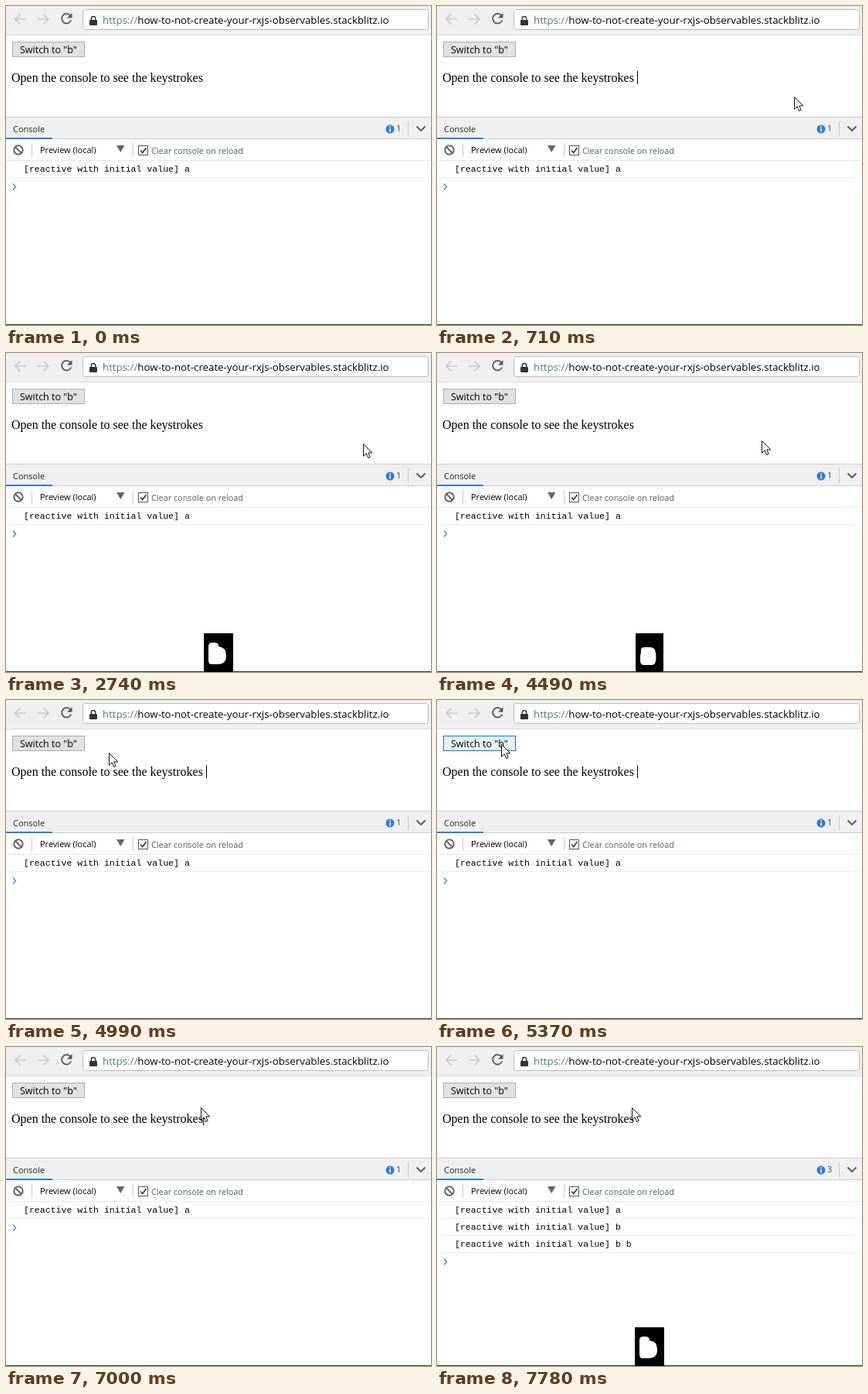
These frames come from a looping animation (550x412 px, 8 s). An HTML page:

```html
<!DOCTYPE html>
<html lang="en">
<head>
<meta charset="utf-8">
<style>
  html, body { margin: 0; width: 100%; height: 100%; overflow: hidden; background: #fff; }
  svg { display: block; font-family: "Open Sans", "Noto Sans", sans-serif; font-size: 11px; }
  text { white-space: pre; }
  .log { font: 11.55px "Liberation Mono", monospace; }
  .line { fill: none; stroke: #ccc; }
  .faint { stroke: #e8e8e8; }
  #button rect { fill: #e1e1e1; stroke: #adadad; }
  #button.hover rect { fill: #e5f1fb; stroke: #0078d7; }
  #button.down rect { fill: #cce4f7; stroke: #005499; }
</style>
</head>
<body>
<svg width="550" height="412" viewBox="0 0 550 412">
  <defs>
    <g id="a"><path d="M11 18H19Q25 18 26 25Q28 41 21 41H11Q6 41 6 35V30Q6 27 7 25Q6 18 11 18Z"/></g>
    <g id="b"><path d="M6 17Q6 12 11 12H14Q19 12 19 17Q29 18 29 29Q29 40 18 40H10Q6 40 6 35Z"/></g>
  </defs>

  <!-- Address bar -->
  <rect width="550" height="37" fill="#f0f0f0"/>
  <path class="line" stroke-opacity=".7" d="M0 37.5H550"/>
  <g fill="none" stroke="#c9c9c9" stroke-width="1.7">
    <path d="M26 17H12M18.5 10.5L12 17L18.5 23.5M41 17H55M48.5 10.5L55 17L48.5 23.5"/>
    <path stroke="#555" stroke-width="1.8" d="M83.6 12.5A6.3 6.3 0 1 0 84.3 18.5"/>
  </g>
  <path d="M85.5 9V15.5H79Z" fill="#555"/>
  <rect x="99.5" y="4.5" width="447" height="26" rx="3" fill="#fff" stroke="#bcbcbc"/>
  <rect x="108" y="18" width="10" height="7" rx="1" fill="#333"/>
  <path d="M110.3 18V16.2a2.7 2.7 0 0 1 5.4 0V18" fill="none" stroke="#333" stroke-width="1.4"/>
  <text x="125" y="23" font-size="13.3"><tspan fill="#4c8068">https</tspan><tspan fill="#777">://</tspan>how-to-not-create-your-rxjs-observables.stackblitz.io</text>

  <!-- Page -->
  <g id="button">
    <rect x="8.5" y="46.5" width="93" height="19"/>
    <text x="18" y="60.5" font-size="12.5">Switch to "b"</text>
  </g>
  <text x="7" y="98" font-family="Liberation Serif, serif" font-size="16">Open the console to see the keystrokes</text>
  <rect id="caret" y="84" width="1" height="17"/>

  <!-- Console -->
  <rect y="143" width="550" height="29" fill="#f0f0f0"/>
  <path class="line" d="M0 143.5H550M0 171.5H550M33.5 177V195M164.5 177V195M520.5 149V168"/>
  <path class="line faint" d="M0 199.5H550"/>
  <rect y="170" width="60" height="2" fill="#2a7de1"/>
  <text x="9" y="163" fill="#222">Console</text>
  <circle cx="497" cy="159" r="5.5" fill="#2a7de1"/>
  <path d="M497 155.3v1.6M497 158v4.5" stroke="#fff" stroke-width="1.6"/>
  <text id="count" x="505" y="162" fill="#444"></text>
  <path d="M531.5 155.5L537 161L542.5 155.5" fill="none" stroke="#555" stroke-width="1.8"/>
  <g fill="none" stroke="#666" stroke-width="2">
    <circle cx="16" cy="186" r="5.7"/><path d="M12 182L20 190"/>
  </g>
  <text x="44" y="190">Preview (local)</text>
  <path d="M143 180H153.5L148.2 189Z" fill="#666"/>
  <rect x="171.5" y="180.5" width="12" height="12" fill="#fff" stroke="#555"/>
  <path d="M174 186.5L176.7 189.5L181.5 183" fill="none" stroke="#333" stroke-width="1.6"/>
  <text x="188" y="191" font-size="10.85" fill="#50605a">Clear console on reload</text>
  <g id="rows"></g>
  <path id="prompt" d="M9 229.5L12.5 233.5L9 237.5" fill="none" stroke="#4a90d9" stroke-width="1.5"/>
  <rect y="411" width="550" height="1" fill="#333"/>

  <g id="keys" fill="#fff"></g>
  <path id="mouse" d="M.5.5V16.3L4.2 12.8L6.7 18.5L9.2 17.4L6.8 11.9H11.8Z" fill="#fff" stroke="#111"/>
</svg>
<script>
const $ = id => document.getElementById(id);
const LOOP = 8000;
const blinks = [680, 1200, 1730, 2250, 2780, 3290, 3850, 4340, 4890, 5420, 5970, 6470, 7000, 7550];
const keyTimes = [[0, ""], [860, "a"], [2310, ""], [2740, "b"], [3880, "ba"], [4340, "a"], [4730, ""], [7390, "bb"], [7780, "b"]];
const logTimes = [[0, 1], [7550, 2], [7750, 3]];
const path = [[160, 469, 335], [710, 462, 117], [4340, 462, 117], [4490, 421, 113],
  [4730, 150, 72], [4890, 150, 72], [5200, 83, 57], [5740, 83, 57], [5970, 252, 78]];
const pressed = [5420, 5560];

const at = (list, t) => list.findLast(step => step[0] <= t)[1];

function mouseAt(t) {
  const i = path.findIndex(p => p[0] > t);
  if (i < 0) return path.at(-1).slice(1);
  const [t0, x0, y0] = path[i - 1], [t1, x1, y1] = path[i];
  const u = (t - t0) / (t1 - t0);
  // accelerate away from a rest, otherwise slow into the stop
  const e = t0 === 4340 ? u * u : t0 === 4490 ? u : u * u * (3 - 2 * u);
  return [x0 + (x1 - x0) * e, y0 + (y1 - y0) * e].map(Math.round);
}

function keyBox(keys) {
  if (!keys) return "";
  const width = 12 + 26 * keys.length - 2 * (keys.split("a").length - 1);
  const left = 275 - width / 2;
  const glyphs = [...keys].map((key, i) => `<use href="#${key}" x="${left + 26 * i}" y="362"/>`);
  return `<rect x="${left}" y="362" width="${width}" height="50" fill="#000"/>` + glyphs.join("");
}

function row(value, i) {
  const y = 214 + 22 * i;
  return `<text class="log" x="23" y="${y}">[reactive with initial value] ${value}</text>` +
    `<path d="M0 ${y + 7.5}H550" stroke="#eee"/>`;
}

function update(id, html) {
  const node = $(id);
  if (node.shown !== html) node.innerHTML = node.shown = html;
}

function draw(t) {
  const on = blinks.filter(b => b <= t).length % 2;
  $("caret").setAttribute("x", t < 5970 ? 259 : 255);
  $("caret").style.visibility = on ? "visible" : "hidden";

  const count = at(logTimes, t);
  update("count", String(count));
  update("rows", ["a", "b", "b b"].slice(0, count).map(row).join(""));
  $("prompt").setAttribute("transform", `translate(0 ${22 * (count - 1)})`);
  update("keys", keyBox(at(keyTimes, t)));

  const shown = t >= path[0][0];
  $("mouse").style.visibility = shown ? "visible" : "hidden";
  if (!shown) return $("button").setAttribute("class", "");
  const [x, y] = mouseAt(t);
  $("mouse").setAttribute("transform", `translate(${x} ${y})`);
  const hover = x >= 8 && x < 102 && y >= 46 && y < 66;
  const down = t >= pressed[0] && t < pressed[1];
  $("button").setAttribute("class", hover ? (down ? "down" : "hover") : "");
}

const start = performance.now();
function tick() {
  draw((performance.now() - start) % LOOP);
  requestAnimationFrame(tick);
}
tick();
</script>
</body>
</html>
```
